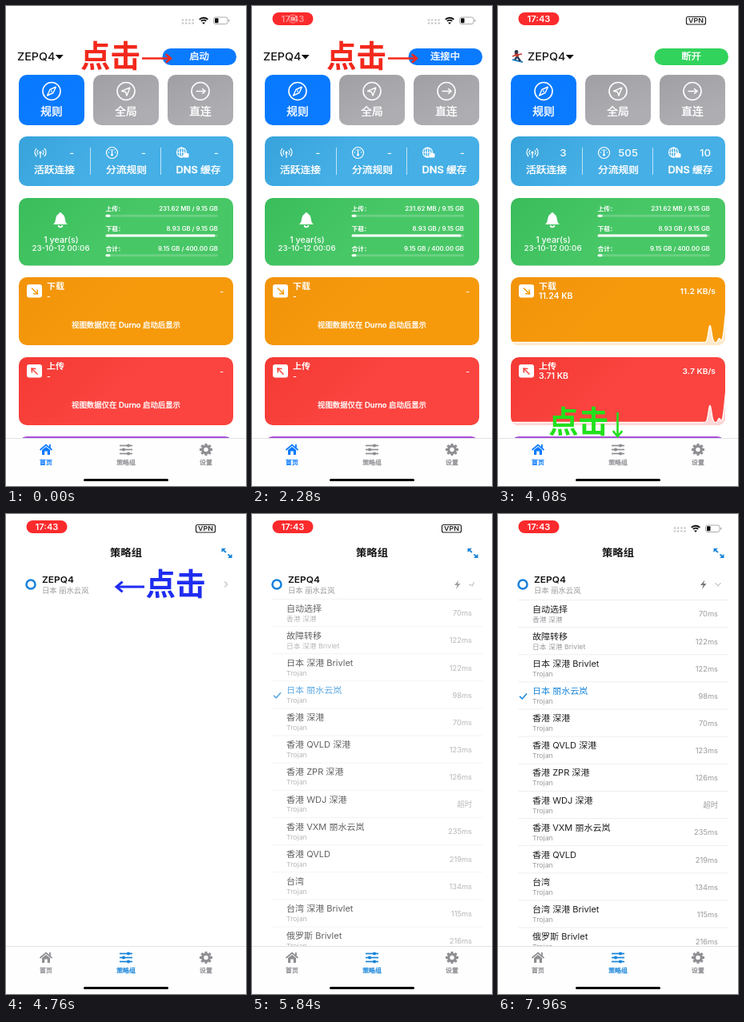
These frames come from a looping animation (300x600 px, 8 s). An HTML page with a canvas:

```html
<!DOCTYPE html>
<html lang="zh-CN">
<head>
<meta charset="utf-8">
<style>
html, body { margin: 0; width: 100%; height: 100%; overflow: hidden; background: #fff; }
canvas { display: block; width: 300px; height: 600px; }
</style>
</head>
<body>
<canvas id="stage"></canvas>
<script>
const canvas = document.getElementById('stage');
const c = canvas.getContext('2d');
const dpr = window.devicePixelRatio || 1;
canvas.width = 300 * dpr;
canvas.height = 600 * dpr;

const LOOP = 8000, CONNECTING = 1440, CONNECTED = 2760, LIST = 4720, EXPAND = 5700, WIFI_BACK = 6120;
const FONT = 'Inter, "Noto Sans CJK SC", "Noto Sans CJK", sans-serif';
const ASPECT = 1.083; // the phone screen is squeezed vertically
const BLUE = '#0a7aff', GRAY = '#8e8e93', LINK = '#1684d9', WHITE = '#fff';
const PROFILE = 'ZEPQ4', NODE = '日本 丽水云岚';

const ROWS = [
  ['自动选择', '70ms', '香港 深港'], ['故障转移', '122ms', '日本 深港 Brivlet'],
  ['日本 深港 Brivlet', '122ms'], [NODE, '98ms'], ['香港 深港', '70ms'],
  ['香港 QVLD 深港', '123ms'], ['香港 ZPR 深港', '126ms'], ['香港 WDJ 深港', '超时'],
  ['香港 VXM 丽水云岚', '235ms'], ['香港 QVLD', '219ms'], ['台湾', '134ms'],
  ['台湾 深港 Brivlet', '115ms'], ['俄罗斯 Brivlet', '216ms']
];

const ramp = (t, a, b) => Math.max(0, Math.min(1, (t - a) / (b - a)));

function text(str, x, y, size, color = WHITE, weight = 500, align = 'left', stretch = ASPECT) {
  c.save();
  c.translate(x, y + size * .36);
  c.scale(stretch, 1);
  c.font = `${weight} ${size}px ${FONT}`;
  c.textAlign = align;
  c.fillStyle = color;
  c.fillText(str, 0, 0);
  // Chinese glyphs have no medium weight, so a thin outline stands in for it
  if (weight === 500 && /[\u4e00-\u9fff]/.test(str)) {
    c.strokeStyle = color;
    c.lineWidth = size * .035;
    c.lineJoin = 'round';
    c.strokeText(str, 0, 0);
  }
  const w = c.measureText(str).width * stretch;
  c.restore();
  return w;
}

function box(x, y, w, h, r, fill) {
  c.beginPath();
  c.roundRect(x, y, w, h, r);
  c.fillStyle = fill;
  c.fill();
}

function card(x, y, w, h, from, to) {
  const g = c.createLinearGradient(x, y, x + w * .3, y + h);
  g.addColorStop(0, from);
  g.addColorStop(1, to);
  box(x, y, w, h, 10, g);
}

function line(pts, color, width = 1.5) {
  c.beginPath();
  for (let i = 0; i < pts.length; i += 2) c.lineTo(pts[i], pts[i + 1]);
  c.strokeStyle = color;
  c.lineWidth = width;
  c.stroke();
}

function poly(pts, color) {
  c.beginPath();
  for (let i = 0; i < pts.length; i += 2) c.lineTo(pts[i], pts[i + 1]);
  c.closePath();
  c.fillStyle = color;
  c.fill();
}

function dot(x, y, r, color) {
  c.beginPath();
  c.arc(x, y, r, 0, 7);
  c.fillStyle = color;
  c.fill();
}

function ring(x, y, r, color, width = 1.5, from = 0, to = Math.PI * 2) {
  c.beginPath();
  c.arc(x, y, r, from, to);
  c.strokeStyle = color;
  c.lineWidth = width;
  c.stroke();
}

function arrow(x1, y1, x2, y2, head, color, width) {
  const a = Math.atan2(y2 - y1, x2 - x1);
  const tip = s => [x2 - head * Math.cos(a + s), y2 - head * Math.sin(a + s)];
  line([x1, y1, x2, y2], color, width);
  line([...tip(.7), x2, y2, ...tip(-.7)], color, width);
}

function statusBar(t) {
  c.globalAlpha = ramp(t, 120, 360);
  box(25.5, 8, 51, 16, 8, '#fb2a2c');
  const shown = c.globalAlpha, clock = ramp(t, 2140, 2420);
  c.globalAlpha = shown * clock;
  text('17:43', 51, 16, 10.3, WHITE, 600, 'center');
  c.globalAlpha = shown * (1 - clock);
  ring(51, 16, 5, WHITE, 1);
  dot(51, 16, 2.7, WHITE);
  c.globalAlpha = 1;

  if (t >= CONNECTED && t < WIFI_BACK) {
    const x = t < LIST ? 235 : 237;
    c.beginPath();
    c.roundRect(x + .5, 13.5, 24, 9.5, 2);
    c.strokeStyle = '#222';
    c.lineWidth = 1.2;
    c.stroke();
    text('VPN', x + 12.5, 18.3, 8.2, '#222', 600, 'center');
    return;
  }
  for (let i = 0; i < 8; i++) dot(221 + i % 4 * 4.2, i < 4 ? 17.5 : 21.5, 1.3, '#c8c8cb');
  const mid = -Math.PI / 2;
  ring(247, 22, 7.3, '#111', 1.9, mid - .8, mid + .8);
  ring(247, 22, 4.4, '#111', 1.8, mid - .8, mid + .8);
  poly([247, 23, 245, 20.4, 249, 20.4], '#111');
  c.beginPath();
  c.roundRect(259.5, 14, 17.5, 8.5, 2.5);
  c.strokeStyle = '#aaa';
  c.lineWidth = 1;
  c.stroke();
  box(261, 15.3, 4.5, 6, 1, '#111');
  box(278, 16.7, 1.3, 3, .7, '#aaa');
}

function tabBar(active, tint) {
  const color = i => i === active ? tint : GRAY;
  box(0, 540, 300, 60, 0, '#fefefe');
  line([0, 540.5, 300, 540.5], '#e2e2e4', 1);

  line([42.5, 555, 50, 548.5, 57.5, 555], color(0), 1.7);
  poly([45, 555, 50, 551, 55, 555, 55, 561, 51.8, 561, 51.8, 556.5, 48.2, 556.5, 48.2, 561, 45, 561], color(0));
  box(54, 548, 1.8, 4, 0, color(0));

  [[549.5, 153], [554.5, 147], [559.5, 153]].forEach(([y, x]) => {
    line([142, y, 158, y], color(1), 1.7);
    dot(x, y, 2.1, color(1));
  });

  for (let i = 0; i < 8; i++) {
    const a = i * Math.PI / 4;
    line([250, 554.5, 250 + 8 * Math.cos(a), 554.5 + 7.5 * Math.sin(a)], color(2), 3);
  }
  dot(250, 554.5, 6, color(2));
  dot(250, 554.5, 2.7, '#fefefe');

  ['首页', '策略组', '设置'].forEach((s, i) => text(s, 50 + i * 100, 570.5, 7.3, color(i), 500, 'center'));
  box(97, 591, 106, 3, 1.5, '#000');
}

function modeCards() {
  ['规则', '全局', '直连'].forEach((s, i) => {
    const x = 16 + i * 93, m = x + 41;
    card(x, 86, 82, 63, i ? '#a09fa4' : '#087aff', i ? '#aeadb2' : '#0a7aff');
    ring(m, 106.5, 11, WHITE, 1.6);
    text(s, m, 131.3, 12.6, WHITE, 500, 'center');
  });
  c.lineJoin = 'round';
  line([62.5, 101, 59, 108.5, 51.5, 112, 55, 104.5, 62.5, 101], WHITE, 1.4);
  dot(57, 106.5, 1, WHITE);
  line([155, 102, 151, 112, 149.5, 107.5, 144.5, 106.3, 155, 102], WHITE, 1.4);
  c.lineJoin = 'miter';
  arrow(237.5, 106.5, 249, 106.5, 5, WHITE, 1.5);
}

function statsCard(on) {
  card(16, 163, 268, 62, '#38a3db', '#45afe6');
  [105.5, 193.5].forEach(x => line([x, 177, x, 211], '#ffffffaa', 1));
  [['活跃连接', '3', 35], ['分流规则', '505', 125], ['DNS 缓存', '10', 212.5]].forEach(([s, n, x], i) => {
    text(s, x, 204.5, 11.8);
    text(on ? n : '-', [85.5, 175, 266][i], 184, 12.3, WHITE, 500, 'right');
  });
  dot(43, 183, 1.6, WHITE);
  line([43, 183, 43, 190], WHITE, 1.2);
  [4, 7].forEach(r => {
    ring(43, 183, r, WHITE, 1.2, -.8, .8);
    ring(43, 183, r, WHITE, 1.2, Math.PI - .8, Math.PI + .8);
  });
  ring(132.5, 183.5, 7, WHITE, 1.2);
  line([132.5, 186, 132.5, 179], WHITE, 1.3);
  dot(132.5, 186, 1.5, WHITE);
  [[128.5, 183], [130, 180], [135, 180], [136.5, 183]].forEach(([x, y]) => dot(x, y, .7, WHITE));
  ring(219.5, 183, 6, WHITE, 1.1);
  c.beginPath();
  c.ellipse(219.5, 183, 2.8, 6, 0, 0, 7);
  c.stroke();
  line([213.5, 183, 225.5, 183], WHITE, 1);
  line([219.5, 177, 219.5, 189], WHITE, 1);
  box(222, 184, 6.5, 5.5, 1.5, WHITE);
}

function planCard() {
  card(16, 240, 268, 84.5, '#3abd5c', '#48c766');
  c.beginPath();
  c.moveTo(59, 273);
  c.bezierCurveTo(64, 270, 60, 260, 68, 259.5);
  c.bezierCurveTo(76, 260, 72, 270, 77, 273);
  c.closePath();
  c.fillStyle = WHITE;
  c.fill();
  dot(68, 259.8, 1.8, WHITE);
  ring(68, 274, 2.3, WHITE, 1.8, 0, Math.PI);
  text('1 year(s)', 69, 292, 9.9, WHITE, 500, 'center');
  text('23-10-12 00:06', 68.5, 303, 9, WHITE, 500, 'center');
  [['上传：', '231.62 MB / 9.15 GB', 6], ['下载：', '8.93 GB / 9.15 GB', 137], ['合计：', '9.15 GB / 400.00 GB', 6]]
    .forEach(([s, n, w], i) => {
      const y = 253.8 + i * 24.7;
      text(s, 124.5, y, 7.2, WHITE, 700);
      text(n, 265, y, 7.2, WHITE, 600, 'right');
      box(124.5, y + 7, 140.5, 3, 1.5, '#ffffff30');
      box(124.5, y + 7, w, 3, 1.5, WHITE);
    });
}

function trafficCard(t, y, label, from, to, up, total, speed) {
  const on = t >= CONNECTED, flowing = t >= 3600;
  card(16, y, 268, 85, from, to);
  if (on) {
    const shift = (4080 - t) * .018;
    c.save();
    c.beginPath();
    c.roundRect(16, y, 268, 85, 10);
    c.clip();
    c.beginPath();
    c.moveTo(14, y + 90);
    for (let x = 14; x <= 286; x += .5) {
      const u = x - shift;
      const peak = 21 * Math.exp(-(((u - 265) / 2.8) ** 2)) + 5 * Math.exp(-(((u - 276.5) / 2) ** 2))
        + 43 * Math.exp(-(((u - 286) / 3.7) ** 2));
      c.lineTo(x, y + 81.5 - peak);
    }
    c.lineTo(286, y + 90);
    c.fillStyle = '#ffffffc8';
    c.fill();
    c.strokeStyle = WHITE;
    c.lineWidth = 1.3;
    c.stroke();
    c.restore();
  }
  box(26, y + 9, 19, 16.5, 3, WHITE);
  if (up) arrow(39.5, y + 21.5, 32, y + 14, 5.5, to, 1.5);
  else arrow(32, y + 13.5, 39.5, y + 21, 5.5, to, 1.5);
  text(label, 51, y + 11.2, 10.2, WHITE, 700);
  text(!on ? '-' : flowing ? total : '0 KB', 51, y + 23.5, 9.7, WHITE, 600);
  text(!on ? '-' : flowing ? speed : '0 KB/s', 272, y + 17.5, 9.5, WHITE, 600, 'right');
  if (!on) text('视图数据仅在 Durno 启动后显示', 150, y + 59.5, 8.7, WHITE, 500, 'center');
}

function homePage(t) {
  const on = t >= CONNECTED, x = on ? 37 : 14;
  if (on) {
    line([18, 67, 31, 70], '#2680c4', 2);
    line([21, 67, 24, 63, 28, 69], '#283850', 2.3);
    line([22, 58.5, 25, 63], '#c33b32', 4);
    line([18, 63, 23, 61, 30, 60], '#c33b32', 1.7);
    dot(23, 57.5, 2.4, '#30394a');
  }
  const end = x + text(PROFILE, x, 63.3, 13.2, '#111', 500);
  poly([end + .5, 61, end + 10.5, 61, end + 5.5, 66.5], '#111');

  box(195.5, 53, 92.5, 21, 10.5, on ? '#32d35c' : BLUE);
  text(on ? '断开' : t < CONNECTING ? '启动' : '连接中', 241.5, 63.3, 11.4, WHITE, 500, 'center');
  modeCards();
  statsCard(on);
  planCard();
  trafficCard(t, 339, '下载', '#f2930a', '#f69a0c', false, '11.24 KB', '11.2 KB/s');
  trafficCard(t, 439, '上传', '#f43a35', '#fb443f', true, '3.71 KB', '3.7 KB/s');
  card(16, 538, 268, 60, '#a650d8', '#a650d8');
  tabBar(0, BLUE);

  if (on) {
    text('点击', 63, 519.5, 37.5, '#22e01c', 700, 'left', 1);
    arrow(149.5, 508, 149.5, 538, 9, '#22e01c', 2.6);
  } else {
    text('点击', 93, 62, 37.5, '#f3281c', 700, 'left', 1);
    arrow(170, 65.5, 206, 65.5, 8, '#f3281c', 2.6);
  }
}

function listPage(t) {
  const open = ramp(t, EXPAND, EXPAND + 200);
  text('策略组', 150, 48.7, 12.3, '#111', 700, 'center');
  line([271, 44.5, 275, 48], LINK, 1.7);
  line([277.5, 50.5, 281.5, 54], LINK, 1.7);
  poly([269.5, 43, 275, 43, 269.5, 48], LINK);
  poly([282.5, 55, 277, 55, 282.5, 50], LINK);

  text(PROFILE, 45, 81.7, 11, '#111', 600);
  const press = Math.min(1, .5 + Math.abs(t - 5680) / 240);
  c.globalAlpha = press;
  ring(31, 88, 5.5, '#1680dc', 2.5);
  text(NODE, 45, 96.3, 8.6, '#98989d', 400);
  c.save();
  c.translate(275, 88);
  c.rotate(open * Math.PI / 2);
  line([-1.8, -3.5, 1.8, 0, -1.8, 3.5], '#c4c4c8', 1.2);
  c.restore();

  if (open) {
    c.globalAlpha = open;
    poly([258.5, 82.5, 253, 89, 256.5, 89, 255, 94, 260.5, 87, 257, 87], '#77777c');
    c.save();
    c.translate(0, -12 * (1 - open) ** 2);
    ROWS.forEach(([name, ms, kind = 'Trojan'], i) => {
      const y = 119 + i * 34.13, picked = i === 3;
      line([25, y - 11.5, 288, y - 11.5], '#eeeef0', 1);
      text(name, 43, y, 10.2, picked ? LINK : '#1c1c1e', 400);
      text(kind, 43, y + 12.7, 8.1, '#98989d', 400);
      text(ms, 275, y + 6.3, 8.6, '#98989d', 400, 'right');
      if (picked) line([27, y + 6.5, 30.3, y + 9.5, 36, y + 3], LINK, 1.5);
    });
    c.restore();
  }
  c.globalAlpha = 1;
  tabBar(1, LINK);
  if (t < EXPAND + 40) {
    text('点击', 174.5, 87.5, 37.5, '#1f2df0', 700, 'left', 1);
    arrow(173, 91, 138, 91, 10, '#1f2df0', 3);
  }
}

function draw(now) {
  const t = now % LOOP;
  c.setTransform(dpr, 0, 0, dpr, 0, 0);
  c.fillStyle = WHITE;
  c.fillRect(0, 0, 300, 600);
  (t < LIST ? homePage : listPage)(t);
  statusBar(t);
}

const start = performance.now();
(function tick() {
  draw(performance.now() - start);
  requestAnimationFrame(tick);
})();
</script>
</body>
</html>
```
